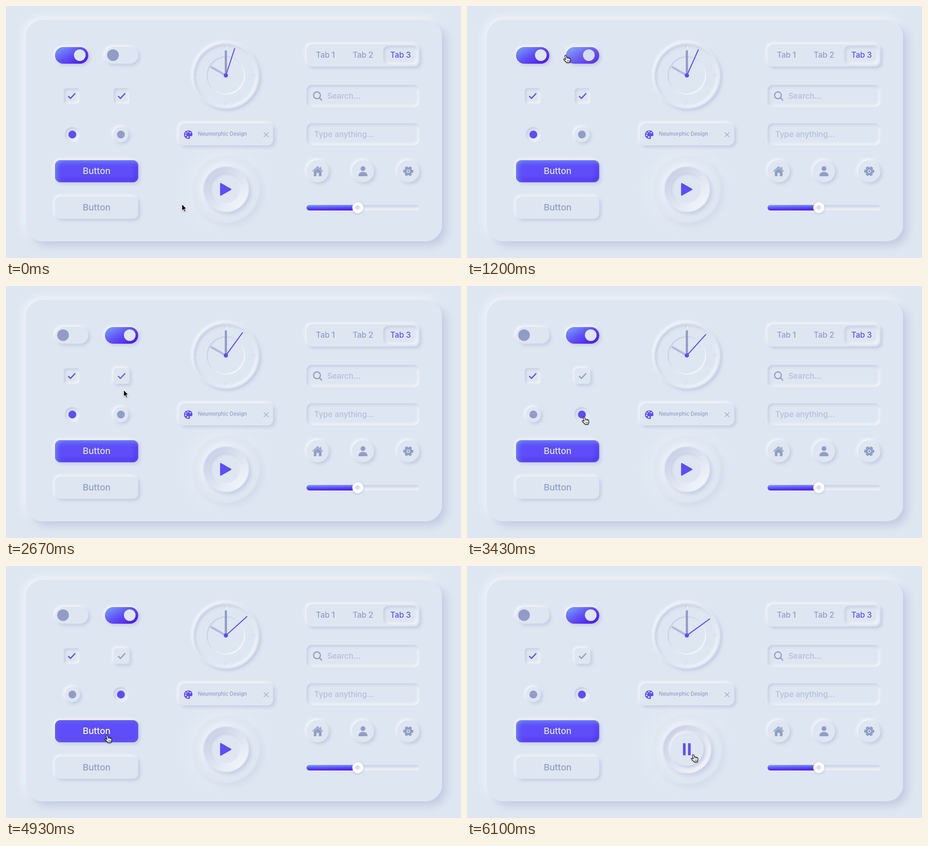
An HTML page for the animation above (6130 ms loop, 984 by 546 pixels).

```html
<!DOCTYPE html>
<html lang="en">
<head>
<meta charset="utf-8">
<title>Neumorphic elements</title>
<style>
:root {
  --bg: #dee6f1; --shade: #c1cae2; --soft: #b3bddd; --dark: #919dc6; --white: #fbfbfe;
  --light: #78a6fa; --primary: #5f4df9; --deep: #4a0fe2;
  --raised: 3.6px 3.6px 7.2px var(--shade), -2.4px -2.4px 6px var(--white);
  --sunken: inset 2.4px 2.4px 6px var(--shade), inset -2.4px -2.4px 6px var(--white);
  --thin: inset 1px 1px 1px var(--shade), inset -1px -1px 1px var(--white);
}
html, body { margin: 0; width: 100%; height: 100%; overflow: hidden; background: var(--bg); }
#stage { position: relative; width: 984px; height: 546px; overflow: hidden; background: var(--bg); }
#stage div { position: absolute; box-sizing: border-box; }
#stage svg { position: absolute; left: 0; top: 0; }
.card { box-shadow: 9.6px 9.6px 16.8px var(--shade), -2.4px -2.4px 21.6px var(--white); }
.raised { box-shadow: var(--raised); }
.sunken { box-shadow: var(--sunken); }
.thin { box-shadow: var(--thin); }
.ring { box-shadow: inset 1.6px 1.6px 2px var(--shade), inset -1.6px -1.6px 2px var(--white); }
.glow { background: linear-gradient(330deg, var(--deep), var(--primary) 50%, var(--light)); }
.fill { background: linear-gradient(-1deg, var(--deep), var(--primary) 50%, var(--light)); }
.thumb { background: #fff; box-shadow: 0 1px 4px rgba(120,135,180,.45); }
.dot { background: linear-gradient(135deg, #c1cae2, #edf1f8); }
.wave { box-shadow: 4.8px 4.8px 9.6px var(--shade), -2.4px -2.4px 21.6px var(--white); filter: blur(1px); }
.dish { background: linear-gradient(to bottom right, var(--shade), var(--white)); }
.face { background: var(--bg); }
text { font-family: Inter, "Open Sans", sans-serif; font-weight: 500; }
</style>
</head>
<body>
<div id="stage">
<svg id="art" width="984" height="546" viewBox="0 0 984 546">
  <g id="labels" text-anchor="middle"></g>

  <circle id="knob1" cy="106.5" r="12.6"/>
  <circle id="knob2" cy="106.5" r="12.6"/>
  <g fill="none" stroke-width="2.6">
    <path id="check1" stroke="#5f4df9" d="M134.5 195.2l5 4.9 10.3-11"/>
    <path id="check2" d="M242.5 195.2l5 4.9 10.3-11"/>
  </g>
  <circle id="radio1" cx="143.5" cy="278.5" r="8.5"/>
  <circle id="radio2" cx="248.5" cy="278.5" r="8.5"/>

  <g stroke-linecap="round">
    <path d="M475.5 150.5L444.5 132.6" stroke="#b3bddd" stroke-width="4.8"/>
    <path d="M475.5 150.5V98.2" stroke="#919dc6" stroke-width="4.8"/>
    <path id="seconds" d="M475.5 150.5V89.5" stroke="#5f4df9" stroke-width="2.2"/>
    <circle cx="475.5" cy="150.5" r="4.6" fill="#5f4df9"/>
  </g>

  <path fill="#5f4df9" d="M394.5 269.5C389 269.5 385 273.5 385 278.7S389 288 395 288C398.3 288 398.2 285.9 397.6 284.4 396.8 282.4 398.4 281.6 400.2 281.9 402.7 282.3 403.4 280.6 403.2 277.7 402.8 272.8 399.5 269.5 394.5 269.5Z"/>
  <g fill="#dee6f1">
    <circle cx="388.6" cy="280.2" r="1.6"/><circle cx="389.2" cy="275.5" r="1.6"/>
    <circle cx="393.4" cy="272.6" r="1.6"/><circle cx="398.2" cy="274.6" r="1.6"/>
    <circle cx="393" cy="284" r="2"/>
  </g>
  <path d="M557.5 273.7l10 10m0-10l-10 10" stroke="#a3aed1" stroke-width="1.6"/>

  <path id="play" d="M464.5 385L486 397.3 464.5 409.5Z" fill="#5f4df9" stroke="#5f4df9" stroke-width="3" stroke-linejoin="round"/>
  <path id="pause" d="M467.6 384.6h4.6v25h-4.6zM478.6 384.6h4.6v25h-4.6z" fill="#5f4df9" stroke="#5f4df9" stroke-linejoin="round"/>

  <g fill="none" stroke="#919dc6" stroke-width="2.5">
    <circle cx="672.5" cy="193.5" r="7.4"/><path d="M677.8 198.8l5.7 5.8"/>
  </g>
  <g fill="#919dc6">
    <path d="M674 351L682.3 358.2V368.7H676.6V361.5H671.4V368.7H665.7V358.2Z"/>
    <path d="M663 358.3L674 348.4 685 358.3M680.8 353.5V348.5" fill="none" stroke="#919dc6" stroke-width="2"/>
    <circle cx="772" cy="352.3" r="5.2"/>
    <path d="M762.2 368.8C762 362.5 766.3 359.6 772 359.6S782 362.5 781.8 368.8Z"/>
    <circle cx="870" cy="358" r="8.4"/>
    <circle cx="870" cy="358" r="8.7" fill="none" stroke="#919dc6" stroke-width="4.4" stroke-dasharray="5.9 3.21" stroke-dashoffset="2.95"/>
    <circle cx="870" cy="358" r="2.9" stroke="#dee6f1" stroke-width="1.5"/>
  </g>

  <g id="cursor" style="filter:drop-shadow(0 1px 1px rgba(0,0,0,.3))">
    <path id="arrow" d="M.5 .5V14.5L3.7 11.5 5.9 16.6 8.3 15.6 6.1 10.6H10.4Z" fill="#000" stroke="#fff" stroke-width="1"/>
    <g id="hand" transform="translate(-6 0)" stroke="#000" stroke-width="1.1" stroke-linejoin="round">
      <path fill="#fff" d="M3.6 2C3.4.2 5.9-.1 6.4 1.6L8 6.4C8.5 5.2 10.3 5.2 10.6 6.6 11.3 5.6 13 6 13.1 7.4 14 6.8 15.2 7.5 15.3 8.8L15.5 11.4C15.5 13.3 14.3 14.3 14.2 16.6H7.2C6.8 14.8 3.6 13 1.4 10.3.4 8.8 2 7.8 3.4 8.8L5.5 10.2Z"/>
      <path fill="none" d="M8 6.4l.6 2.5M10.6 6.6l.4 2.5M13.1 7.4l.2 2M9 11.5v3M11 11.5v3M13 11.5v3" stroke-width=".8"/>
    </g>
  </g>
</svg>
</div>
<script>
const LOOP = 6130;
const $ = id => document.getElementById(id);
const stage = $('stage'), art = $('art');

function box(cls, x, y, w, h, radius) {
  const el = document.createElement('div');
  el.className = cls;
  el.style.cssText = `left:${x}px;top:${y}px;width:${w}px;height:${h}px;border-radius:${radius}px`;
  stage.insertBefore(el, art);
  return el;
}
const disc = (cls, cx, cy, r) => box(cls, cx - r, cy - r, 2 * r, 2 * r, r);

function label(str, x, y, size, color, anchor = 'middle', weight = 500) {
  const el = document.createElementNS('http://www.w3.org/2000/svg', 'text');
  const attrs = { x, y, 'font-size': size, fill: color, 'text-anchor': anchor };
  for (const key in attrs) el.setAttribute(key, attrs[key]);
  el.style.fontWeight = weight;
  el.textContent = str;
  $('labels').append(el);
  return el;
}

const PRIMARY = [95, 77, 249], DARK = [145, 157, 198], PALE = [222, 230, 241],
      LIGHT = [120, 166, 250], DEEP = [74, 15, 226], WHITE = [255, 255, 255];
const mix = (a, b, k) => `rgb(${a.map((v, i) => v + (b[i] - v) * k)})`;

// Layout
box('card', 43, 30, 900, 480, 36);
const switches = [106, 214].map(x => {
  box('raised', x, 89, 72, 36, 18);
  return box('glow', x, 89, 72, 36, 18);
});
box('sunken', 125.2, 178, 33.6, 33.6, 6);
const checkBox = box('sunken', 233.2, 178, 33.6, 33.6, 6);
const radios = [143.5, 248.5].map(x => disc('raised', x, 278.5, 16.8));
const mainButton = box('', 106, 334, 180, 48, 12);
const plainButton = box('raised', 106, 413, 180, 48, 12);

disc('raised', 475.5, 151, 72);
disc('sunken', 475.5, 151, 68.5);
disc('ring', 475.8, 150.8, 41.5);
for (const y of [85, 209]) box('thin', 474.3, y, 2.6, 7.2, 1);
for (const x of [410, 534]) box('thin', x, 149.5, 7.2, 2.6, 1);
box('raised', 374, 254, 204, 48, 12);
const waves = [disc('wave', 476, 397, 48), disc('wave dish', 476, 397, 48)];
const playButton = disc('face', 476, 397, 36);

box('raised', 650, 83, 244, 48, 12);
box('sunken', 816, 86, 75, 41, 12);
box('sunken', 650, 171, 244, 48, 12);
box('sunken', 650, 254, 244, 48, 12);
for (const x of [674, 772, 870]) disc('raised', x, 358, 24);
box('sunken', 650, 431, 244, 12, 6);
box('fill', 650, 431, 111, 12, 6);
disc('thumb', 761, 437, 12);
disc('dot', 761, 437, 5);

const mainLabel = label('Button', 196, 364, 19.2, '');
const plainLabel = label('Button', 196, 443, 19.2, '');
label('Tab 1', 690.7, 112, 16.8, '#919dc6');
label('Tab 2', 772, 112, 16.8, '#919dc6');
label('Tab 3', 853.3, 112, 16.8, '#5f4df9');
label('Search...', 695, 201, 16.8, '#b3bddd', 'start');
label('Type anything...', 666.5, 284, 16.8, '#b3bddd', 'start');
label('Neumorphic Design', 415, 281.3, 11.2, '#919dc6', 'start');

// Timing: the CSS "ease" curve
function ease(x) {
  if (x <= 0) return 0;
  if (x >= 1) return 1;
  let lo = 0, hi = 1;
  for (let i = 0; i < 18; i++) {
    const s = (lo + hi) / 2;
    const at = .75 * s * (1 - s) + s * s * s;
    at < x ? lo = s : hi = s;
  }
  return .3 * lo * (1 - lo) ** 2 + 3 * lo * lo * (1 - lo) + lo ** 3;
}
const since = (t, start, length = 300) => ease((t - start) / length);
const during = (t, start, end) => since(t, start) - since(t, end);
const within = (t, start, end) => t >= start && t < end;

// Cursor moves: start, end, x, y of arrival
const moves = [
  [0, 0, 380, 429], [60, 720, 243, 106], [1080, 1420, 143, 106], [1720, 2180, 254, 198],
  [2490, 2970, 254, 282], [3400, 4040, 219, 428], [4470, 4750, 219, 366], [5050, 5650, 490, 408]
];
function cursorAt(t) {
  let [, , x, y] = moves[0];
  for (const [start, end, tx, ty] of moves.slice(1)) {
    if (t < start) break;
    const u = Math.min(1, (t - start) / (end - start)), k = u * u * (3 - 2 * u);
    x += (tx - x) * k;
    y += (ty - y) * k;
  }
  return [x, y];
}
const hotspots = [
  [106, 89, 72, 36], [214, 89, 72, 36], [125, 178, 34, 34], [233, 178, 34, 34],
  [127, 262, 34, 34], [232, 262, 34, 34], [106, 334, 180, 48], [106, 413, 180, 48], [440, 361, 72, 72]
];
const isHot = (px, py) => hotspots.some(([x, y, w, h]) => px >= x && px <= x + w && py >= y && py <= y + h);

const CLICK = { switch2: 960, switch1: 1515, check: 2300, radio: 3150, play: 5840 };
const show = (el, on) => el.setAttribute('visibility', on ? 'visible' : 'hidden');
const paint = (el, attr, color) => el.setAttribute(attr, color);
const setDepth = (el, sunken) => el.style.boxShadow = `var(--${sunken ? 'sunken' : 'raised'})`;

function draw(t) {
  const on = [1 - since(t, CLICK.switch1, 400), since(t, CLICK.switch2, 400)];
  on.forEach((k, i) => {
    switches[i].style.opacity = k;
    const knob = $('knob' + (i + 1));
    knob.setAttribute('cx', 123.4 + 108 * i + 36.2 * k);
    paint(knob, 'fill', mix(DARK, PALE, k));
  });

  setDepth(checkBox, t < CLICK.check);
  paint($('check2'), 'stroke', mix(PRIMARY, DARK, since(t, 2615)));

  const second = t >= CLICK.radio;
  setDepth(radios[0], !second);
  setDepth(radios[1], second);
  paint($('radio1'), 'fill', mix(PRIMARY, DARK, since(t, CLICK.radio)));
  paint($('radio2'), 'fill', mix(DARK, PRIMARY, since(t, 2816)));

  const press = during(t, 4780, 4860);
  mainButton.style.background = mix(PRIMARY, PRIMARY, 0);
  mainButton.style.boxShadow = `inset 2.4px 2.4px 12px ${mix(LIGHT, DEEP, press)}, ` +
    `inset -2.4px -2.4px 12px ${mix(DEEP, LIGHT, press)}, var(--raised)`;
  paint(mainLabel, 'fill', mix(PALE, WHITE, during(t, 3660, 3800) + during(t, 4660, 5250)));
  setDepth(plainButton, within(t, 4260, 4360));
  paint(plainLabel, 'fill', mix(DARK, PRIMARY, during(t, 3930, 4560)));

  const tick = Math.floor((t - 420) / 1000) + 1;
  $('seconds').setAttribute('transform', `rotate(${18 + 6 * tick} 475.5 150.5)`);

  const playing = t >= CLICK.play;
  const growth = Math.max(0, t - CLICK.play) / 4000;
  waves[0].style.transform = `scale(${1.51 + growth})`;
  waves[0].style.opacity = .42 - growth;
  waves[1].style.transform = `scale(${1.02 + growth})`;
  setDepth(playButton, !playing);
  show($('play'), !playing);
  show($('pause'), playing);

  const [x, y] = cursorAt(t), hot = isHot(x, y);
  $('cursor').setAttribute('transform', `translate(${Math.round(x)} ${Math.round(y)})`);
  show($('arrow'), !hot);
  show($('hand'), hot);
}

const begin = performance.now();
function frame() {
  draw((performance.now() - begin) % LOOP);
  requestAnimationFrame(frame);
}
draw(0);
requestAnimationFrame(frame);
</script>
</body>
</html>
```
